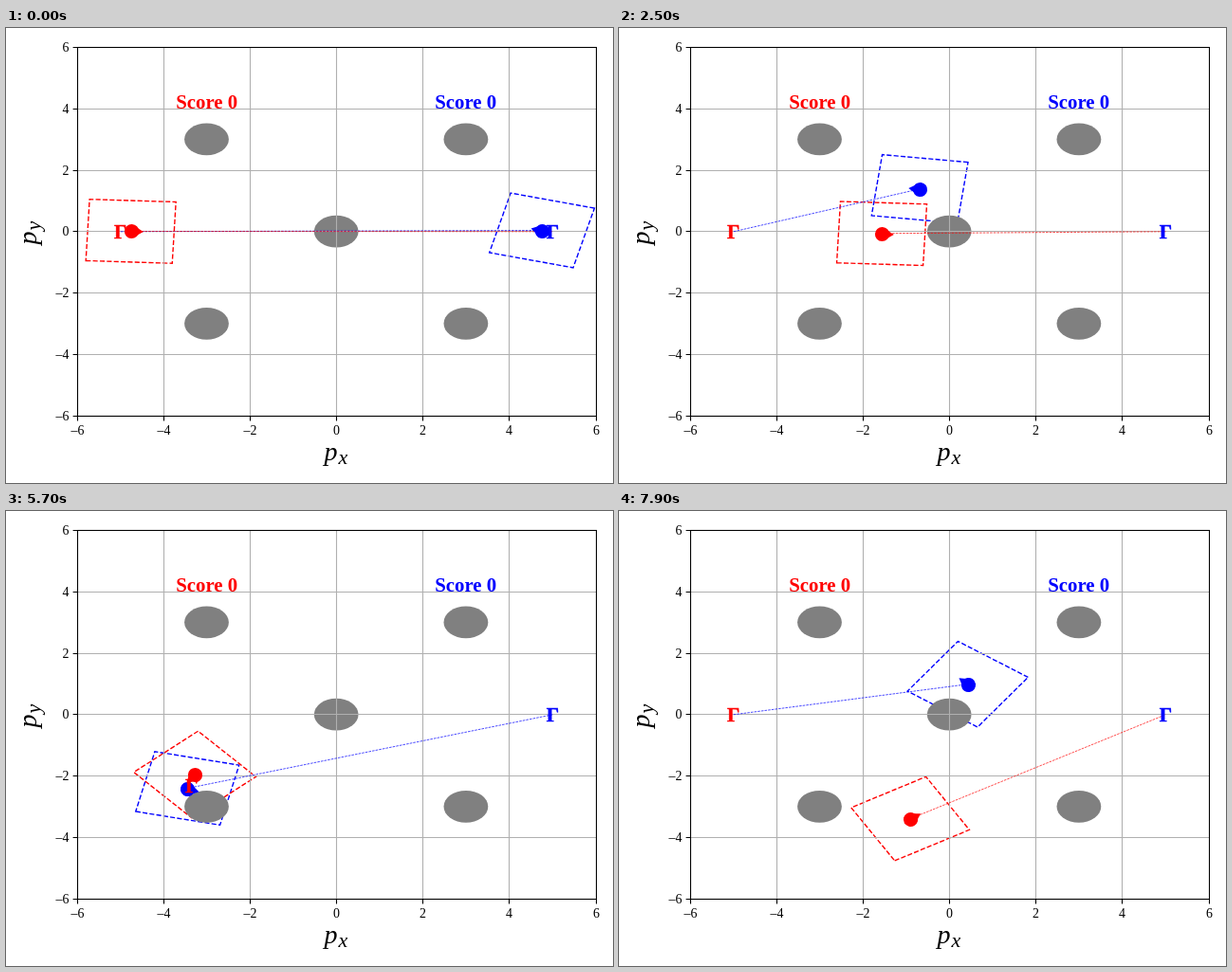
These frames come from a looping animation (640 by 480 pixels, 8 s). An HTML page:

```html
<!DOCTYPE html>
<html lang="en">
<head>
<meta charset="utf-8">
<title>Capture the flag</title>
<style>
  html, body { margin: 0; width: 100%; height: 100%; overflow: hidden; background: #fff; }
  svg { display: block; width: 640px; height: 480px; }
  text { font-family: "Liberation Serif", Times, serif; font-size: 13.9px; }
  .score { font-size: 20.8px; font-weight: bold; text-anchor: middle; }
  .flag { font-size: 21px; font-weight: bold; text-anchor: middle; stroke-width: .5; }
  .label { font-size: 28px; font-style: italic; }
  .sub { font-size: 22px; }
  .box { fill: none; stroke-width: 1.39; stroke-dasharray: 5.14 2.22; }
  .aim { stroke-width: .7; stroke-dasharray: 2.57 1.11; }
  .grid { stroke: #b0b0b0; stroke-width: 1.1; }
  .axis { stroke: #000; stroke-width: 1.1; fill: none; }
</style>
</head>
<body>
<svg id="stage" viewBox="0 0 640 480">
  <clipPath id="plot"><rect x="75" y="20" width="547" height="389"/></clipPath>
</svg>
<script>
const LOOP = 8000, STEP = 100, SPEED = 2.5;
const CAPTURE = 4.2, TAGGED = 5.8, RESTART = 5.9;
const RED = '#f00', BLUE = '#00f';
const RED_HOME = [-5, 0], BLUE_HOME = [5, 0];
const stage = document.getElementById('stage');

const px = x => 348.6 + 45.57 * x;
const py = y => 214.8 - 32.4 * y;
const pixel = v => Math.floor(v) + .5;

function set(node, attrs) {
  for (const key in attrs) node.setAttribute(key, attrs[key]);
}
function add(tag, attrs, text, parent = stage) {
  const node = document.createElementNS('http://www.w3.org/2000/svg', tag);
  set(node, attrs);
  if (text) node.textContent = text;
  parent.append(node);
  return node;
}

// Key poses: seconds, x, y, heading in degrees
const blueKeys = [
  [0, 4.75, .04, 165.75], [1, 2.74, 1.41, 183.5], [2, .42, .99, 144.2],
  [2.5, -.69, 1.39, 172.9], [4, -4.22, .37, 207.8], [4.9, -5, -1.38, 301.3],
  [TAGGED, -3.2, -2.45, 350]
];
const redKeys = [
  [CAPTURE, -1.55, -.06, -75], [4.9, -1.99, -.64, -103.3],
  [5.7, -3.28, -1.95, -138], [6.5, -3.95, -3.47, -61.3], [7.9, -.91, -3.39, 30.2]
];

// Smooth curve through the key poses, heading along the direction of travel
function follow(keys, t) {
  const i = Math.max(1, keys.findIndex(key => key[0] >= t));
  const a = keys[i - 1], b = keys[i];
  const u = Math.max(0, (t - a[0]) / (b[0] - a[0]));
  const reach = 1.13 * Math.hypot(b[1] - a[1], b[2] - a[2]);
  const axis = (k, trig) => {
    const gap = b[k] - a[k];
    const out = reach * trig(a[3] * Math.PI / 180), into = reach * trig(b[3] * Math.PI / 180);
    return {
      at: a[k] + gap * u * u * (3 - 2 * u) + out * u * (1 - u) ** 2 - into * u * u * (1 - u),
      rate: 6 * gap * u * (1 - u) + out * (1 - u) * (1 - 3 * u) + into * u * (3 * u - 2)
    };
  };
  const x = axis(1, Math.cos), y = axis(2, Math.sin);
  return { x: x.at, y: y.at, angle: Math.atan2(y.rate, x.rate) };
}

// Red runs straight until the obstacle stops it
function redPose(t) {
  if (t >= CAPTURE) return follow(redKeys, t);
  const run = Math.min(SPEED * t, 3.19);
  return { x: -4.76 + run, y: .01 - .022 * run, angle: -.043 };
}

const bluePose = t => follow(blueKeys, t < TAGGED ? t : t - RESTART);

function drawGrid() {
  for (let v = -4; v <= 4; v += 2) {
    add('path', { class: 'grid', d: `M${pixel(px(v))} 20V409M75 ${pixel(py(v))}H622` });
  }
}

function drawLabel(sub, transform) {
  const label = add('text', { class: 'label', transform }, 'p');
  add('tspan', { class: 'sub', dx: 1, dy: 4 }, sub, label);
}

function drawAxes() {
  add('rect', { class: 'axis', x: 75.5, y: 20.5, width: 547, height: 389 });
  for (let v = -6; v <= 6; v += 2) {
    const x = pixel(px(v)), y = pixel(py(v)), name = v < 0 ? '–' + -v : String(v);
    add('path', { class: 'axis', d: `M${x} 409.5v4.9M75.5 ${y}h-4.9` });
    add('text', { x, y: 429, 'text-anchor': 'middle' }, name);
    add('text', { x: 66.5, y: y + 4.6, 'text-anchor': 'end' }, name);
  }
  drawLabel('x', 'translate(335.5 456)');
  drawLabel('y', 'translate(31.5 228.5) rotate(-90)');
}

function drawObstacle(x, y) {
  add('ellipse', { cx: px(x) - .4, cy: py(y) - .2, rx: 23.4, ry: 16.9, fill: '#808080' });
}

function makeAgent(color) {
  return {
    box: add('polygon', { class: 'box', stroke: color }, '', boxes),
    aim: add('line', { class: 'aim', stroke: color }, '', lines),
    body: add('g', { fill: color }, '', markers)
  };
}

function drawBody({ body }) {
  add('circle', { r: 7.6 }, '', body);
  add('path', { d: 'M12.3 0L3.5 5.3V-5.3Z' }, '', body);
}

function placeAgent({ box, aim, body }, { x, y, angle }, [tx, ty]) {
  const c = Math.cos(angle), s = Math.sin(angle);
  const corners = [[-1, -1], [1, -1], [1, 1], [-1, 1]].map(([a, b]) =>
    `${px(x + a * c - b * s)},${py(y + a * s + b * c)}`);
  set(box, { points: corners.join(' ') });
  set(aim, { x1: px(x), y1: py(y), x2: px(tx), y2: py(ty) });
  const cx = Math.round(px(x)) + .5, cy = Math.round(py(y)) + .5;
  set(body, { transform: `translate(${cx} ${cy}) rotate(${-angle * 180 / Math.PI})` });
}

const makeFlag = color => add('text', { class: 'flag', fill: color, stroke: color }, 'Γ');
const placeFlag = (flag, [x, y]) => set(flag, { x: px(x), y: py(y) + 7 });

const boxes = add('g', { 'clip-path': 'url(#plot)' });
drawObstacle(0, 0);
for (const x of [-3, 3]) for (const y of [-3, 3]) drawObstacle(x, y);
drawGrid();
const lines = add('g', {}), markers = add('g', {});
const blue = makeAgent(BLUE), red = makeAgent(RED);
[blue, red].forEach(drawBody);
const redFlag = makeFlag(RED), blueFlag = makeFlag(BLUE);
placeFlag(blueFlag, BLUE_HOME);
drawAxes();
add('text', { class: 'score', x: 211.7, y: 85, fill: RED }, 'Score 0');
add('text', { class: 'score', x: 484.7, y: 85, fill: BLUE }, 'Score 0');

function render(ms) {
  const t = Math.floor(ms % LOOP / STEP) * STEP / 1000;
  const carried = t >= CAPTURE && t < TAGGED;
  const hunter = redPose(t), runner = bluePose(t);
  placeAgent(red, hunter, carried ? [runner.x, runner.y] : BLUE_HOME);
  placeAgent(blue, runner, carried ? BLUE_HOME : RED_HOME);
  placeFlag(redFlag, carried ? [runner.x + .1, runner.y + .08] : RED_HOME);
}

const start = performance.now();
function tick() {
  render(performance.now() - start);
  requestAnimationFrame(tick);
}
tick();
</script>
</body>
</html>
```
